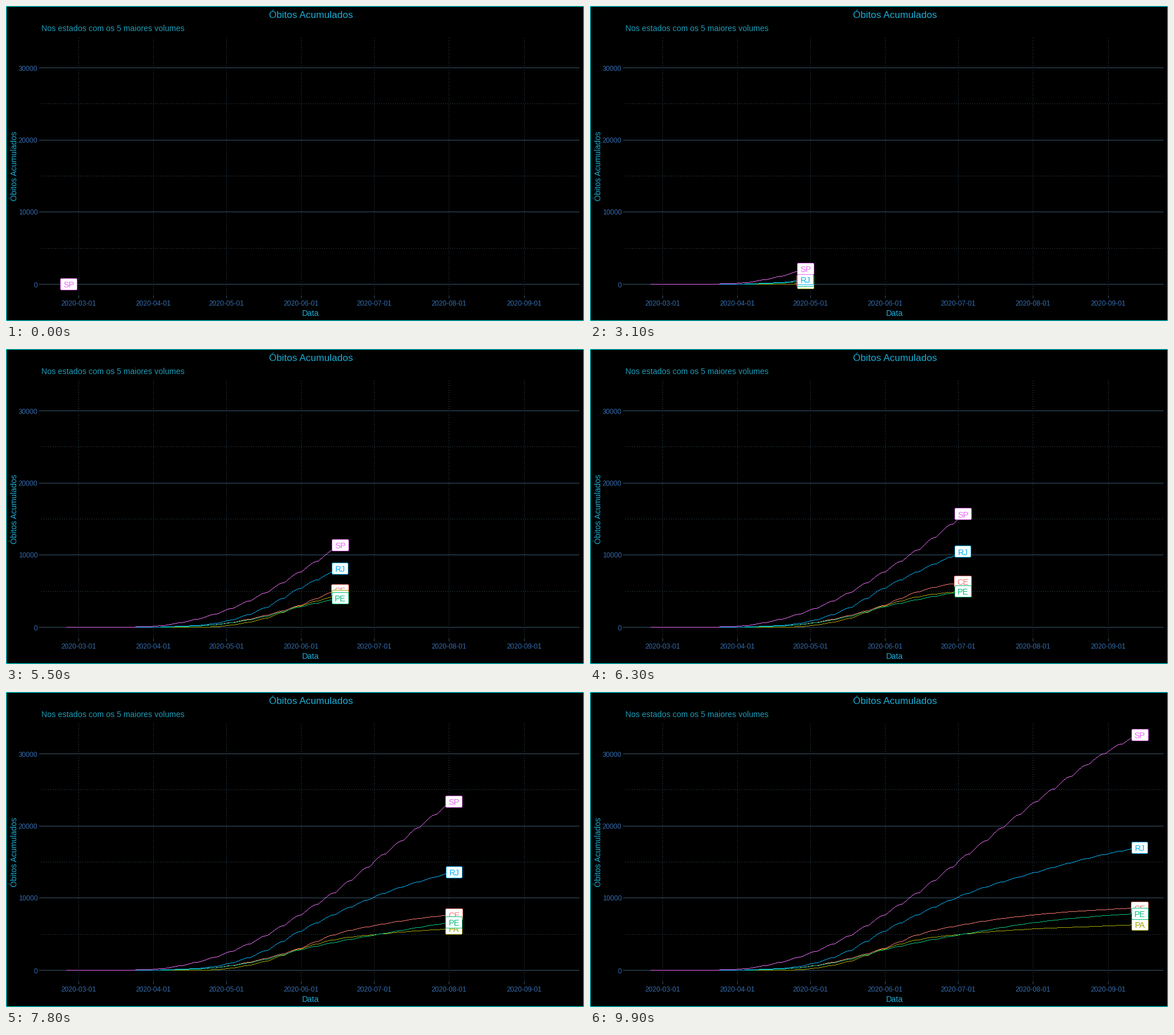
Write a matplotlib script that moves like this. It is 1013 px wide and 553 px high and loops after 10 s.

```python
import math

import numpy as np
import matplotlib.pyplot as plt
from matplotlib.animation import FuncAnimation
from matplotlib.patches import FancyBboxPatch

W, H, DPI = 1013, 553, 64
PT = 72 / DPI                      # points per pixel
FRAMES, INTERVAL = 100, 100
LAST_DAY = 202                     # days counted from 2020-02-25
LEFT, RIGHT, TOP, BOTTOM = 62, 1005, 54, 509

GRID = "#38566b"
AXIS_TEXT = "#346cad"
TITLE = "#1aaed6"
SUBTITLE = "#1a9cb8"
CYAN = "#00ffff"

plt.rcParams["font.family"] = "Liberation Sans"

# Share of a week's deaths reported by the end of Monday .. Sunday.
WEEK = np.array([0.04, 0.23, 0.42, 0.61, 0.78, 0.93, 1.0])

# Days at which the totals below are reached.
KEY_DAYS = np.array([20, 40, 68, 82, 96, 110, 131, 159, 187, 202])

# code: (colour, first day, box width, totals on the key days)
STATES = {
    "CE": ("#F8766D", 30, 30,
           [0, 26, 663, 1641, 3020, 4882, 6430, 7709, 8399, 8670]),
    "PA": ("#A3A500", 36, 29,
           [0, 1, 305, 1239, 2925, 4201, 5070, 5755, 6130, 6337]),
    "PE": ("#00BF7D", 29, 29,
           [0, 21, 628, 1516, 2807, 3830, 5110, 6630, 7560, 7865]),
    "RJ": ("#00B0F6", 23, 28,
           [0, 64, 1019, 2715, 5344, 7672, 10667, 13572, 16016, 17030]),
    "SP": ("#E76BF3", 0, 29,
           [0, 275, 2627, 4782, 7615, 10694, 16078, 23317, 29978, 32750]),
}


def day_x(day):
    return 106.1 + day * 4.2446


def val_y(value):
    return 488.7 - value * 0.01268


def smooth(t, ts, vs):
    """Cubic Hermite curve through the key points."""
    slope = np.gradient(vs, ts)
    i = np.clip(np.searchsorted(ts, t, side="right") - 1, 0, len(ts) - 2)
    h = ts[i + 1] - ts[i]
    u = (t - ts[i]) / h
    ease = u * u * (3 - 2 * u)
    return (vs[i] + (vs[i + 1] - vs[i]) * ease
            + h * u * (1 - u) * (slope[i] * (1 - u) - slope[i + 1] * u))


def daily(totals):
    """Smooth growth, bent by the weekday rhythm of the reports."""
    week, weekday = np.divmod(np.arange(LAST_DAY + 1) + 1, 7)
    t = 7 * (week + WEEK[weekday]) - 2
    t = np.clip(t, KEY_DAYS[0], KEY_DAYS[-1])
    values = smooth(t, KEY_DAYS, np.array(totals, float))
    return np.maximum.accumulate(np.maximum(values, 0))


fig = plt.figure(figsize=(W / DPI, H / DPI), dpi=DPI, facecolor="black")
ax = fig.add_axes([0, 0, 1, 1])
ax.set(xlim=(0, W), ylim=(H, 0))
ax.axis("off")


def hline(row, x0, x1, color=GRID, **kw):
    ax.plot([x0, x1], [row + 0.5] * 2, color=color, lw=PT, snap=False,
            solid_capstyle="butt", **kw)


def vline(col, y0, y1, color=GRID, **kw):
    ax.plot([col + 0.5] * 2, [y0, y1], color=color, lw=PT, snap=False,
            solid_capstyle="butt", **kw)


def text(x, y, s, size, color, **kw):
    kw.setdefault("ha", "center")
    return ax.text(x, y, s, fontsize=size * PT, color=color,
                   va="baseline", **kw)


def draw_grid():
    dotted = dict(dashes=(1, 3), dash_capstyle="butt")
    for v in (5000, 15000, 25000):
        hline(math.floor(val_y(v)), LEFT, RIGHT, **dotted)
    for month, day in zip(range(3, 10), (5, 36, 66, 97, 127, 158, 189)):
        col = math.floor(day_x(day))
        vline(col, BOTTOM, TOP, **dotted)
        vline(col, BOTTOM, BOTTOM + 4)
        text(col, 526.5, f"2020-{month:02d}-01", 12, AXIS_TEXT)
    for v in range(0, 40000, 10000):
        row = math.floor(val_y(v))
        hline(row, LEFT - 4, RIGHT)
        text(55.5, row + 5.5, str(v), 12, AXIS_TEXT, ha="right")


def draw_titles():
    text(534.5, 21, "Óbitos Acumulados", 17, TITLE)
    text(62, 44.5, "Nos estados com os 5 maiores volumes", 14.1, SUBTITLE,
         ha="left")
    text(533.5, 544.5, "Data", 14.1, TITLE)
    text(19, 281, "Óbitos Acumulados", 14.1, TITLE, rotation=90,
         rotation_mode="anchor")


def draw_border():
    for row in (0, H - 1):
        hline(row, 0, W, CYAN)
    for col in (0, W - 1):
        vline(col, 0, H, CYAN)


class Series:
    def __init__(self, code, order):
        self.color, self.start, self.width, totals = STATES[code]
        days = np.arange(LAST_DAY + 1)
        self.x, self.y = day_x(days), val_y(daily(totals))
        # one pixel per column, taller where the curve is steep
        self.first = int(self.x[self.start])
        self.cols = np.arange(self.first, int(self.x[-1]) + 2)
        rows = np.floor(np.interp(self.cols[:-1] + 0.5, self.x, self.y))
        self.tops = rows
        self.bottoms = np.maximum(rows + 1, np.append(rows[0], rows[:-1]))
        self.curve = ax.stairs(self.tops, self.cols, baseline=self.bottoms,
                               fill=True, color=self.color, lw=0,
                               snap=False, zorder=5 + order)
        z = 20 + 2 * order
        self.box = FancyBboxPatch(
            (0, 0), self.width, 20, boxstyle="round,pad=0,rounding_size=2",
            fc="white", ec=self.color, lw=PT, snap=False, zorder=z)
        ax.add_patch(self.box)
        self.label = text(0, 0, code, 14.5, self.color, zorder=z + 1)

    def show(self, day):
        on = day >= self.start
        for part in (self.curve, self.box, self.label):
            part.set_visible(on)
        if not on:
            return
        x, y = self.x[day], self.y[day]
        n = int(x) - self.first + 1
        self.curve.set_data(self.tops[:n], self.cols[:n + 1],
                            self.bottoms[:n])
        self.box.set_x(math.floor(x - self.width / 2) + 0.5)
        self.box.set_y(math.floor(y - 10) + 0.5)
        self.label.set_position((x, y + 5.7))


draw_grid()
draw_titles()
draw_border()
series = [Series(code, i) for i, code in enumerate(STATES)]
ax.set(xlim=(0, W), ylim=(H, 0))


def update(i):
    day = max(1, math.ceil(i * LAST_DAY / (FRAMES - 1)))
    for s in series:
        s.show(day)
    return []


anim = FuncAnimation(fig, update, frames=FRAMES, interval=INTERVAL,
                     repeat=True, repeat_delay=0, init_func=lambda: update(0))
plt.show()
```
